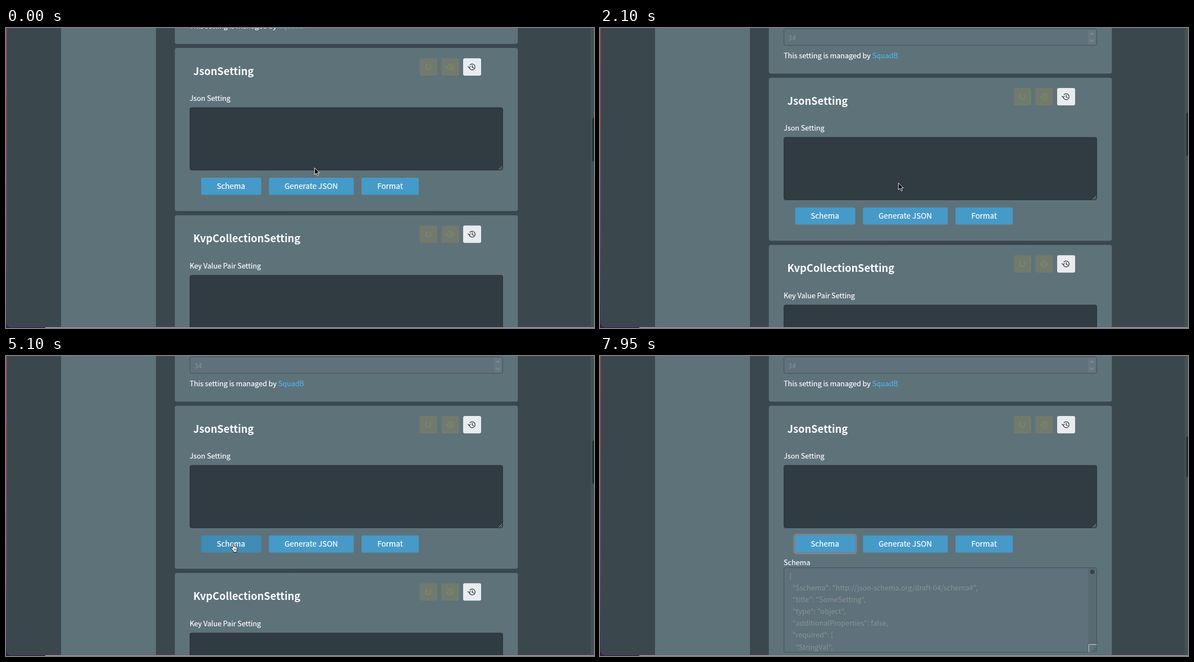
These frames come from a looping animation (1047 px wide and 535 px high, 8 s). An HTML page:

```html
<!DOCTYPE html>
<html lang="en">
<head>
<meta charset="utf-8">
<title>Settings page</title>
<style>
  html, body { margin: 0; width: 100%; height: 100%; overflow: hidden; background: #3a474c; }
  svg { display: block; }
  text { font: 12.6px "Noto Sans CJK JP", "Noto Sans CJK SC", "Noto Sans", sans-serif; fill: #fff; stroke: #fff; stroke-width: .2px; }
  .title { font-size: 18.3px; font-weight: 700; stroke: none; }
  .btn text { font-size: 13.5px; text-anchor: middle; }
  .btn rect { fill: #469ac8; }
  .btn .hover { fill: var(--btn); }
  .link { fill: #4db5ea; stroke: #4db5ea; }
  .muted, .muted text { fill: #8a9397; stroke: none; }
  .card { fill: #5e727a; stroke: #687b83; stroke-width: .6px; }
  .area { fill: #303c41; stroke: #2a3539; }
  .off { fill: #5f717a; stroke: #46545a; }
  .line { fill: none; stroke-linecap: round; stroke-linejoin: round; }

  #stage {
    --y: 0px; --ty: 151px; --th: 77px; --grow: 0px; --open: 0;
    --cx: 549px; --cy: 249px; --arrow: 1; --hand: 0; --btn: #469ac8;
    animation: scroll 8s step-end infinite, grow 8s step-end infinite,
      bar 8s step-end infinite, move 8s step-end infinite, pointer 8s step-end infinite;
  }
  #page { transform: translateY(var(--y)); }
  #below { transform: translateY(var(--grow)); }
  #first { height: calc(290px + var(--grow)); }
  #schema { opacity: var(--open); }
  .tall { height: max(0px, var(--grow) - 25.5px); }
  #grip { transform: translateY(calc(var(--grow) - 95.5px)); }
  #thumb { y: var(--ty); height: var(--th); }
  #cursor { transform: translate(var(--cx), var(--cy)); }
  #arrow { opacity: var(--arrow); }
  #hand { opacity: var(--hand); }

  @keyframes scroll {
    0% { --y: -53px; }
    1.875% { --y: -37px; }
    5.625% { --y: -17.6px; }
    7.5% { --y: -6px; }
    9.375%, 100% { --y: 0px; }
  }
  @keyframes bar {
    0% { --ty: 160px; --th: 78px; }
    1.875% { --ty: 157px; --th: 78px; }
    5.625% { --ty: 154px; --th: 78px; }
    7.5% { --ty: 152px; --th: 77px; }
    9.375% { --ty: 151px; --th: 77px; }
    65.625% { --ty: 147px; --th: 75px; }
    93.75% { --ty: 146px; --th: 75px; }
    95.625% { --ty: 145px; --th: 74px; }
    97.5% { --ty: 144px; --th: 73px; }
    99.375%, 100% { --ty: 143px; --th: 73px; }
  }
  @keyframes grow {
    0% { --grow: 0px; --open: 0; }
    65.625% { --grow: 95.5px; --open: 1; }
    93.75% { --grow: 105.5px; --open: 1; }
    95.625% { --grow: 130.5px; --open: 1; }
    97.5% { --grow: 157.5px; --open: 1; }
    99.375%, 100% { --grow: 176.5px; --open: 1; }
  }
  @keyframes move {
    0% { --cx: 549px; --cy: 249px; }
    26.25% { --cx: 531px; --cy: 276px; }
    28.125% { --cx: 462px; --cy: 305px; }
    30% { --cx: 401px; --cy: 304px; }
    31.875% { --cx: 458px; --cy: 336px; }
    33.75% { --cx: 520px; --cy: 314px; }
    35.625% { --cx: 541px; --cy: 306px; }
    41.25% { --cx: 540px; --cy: 308px; }
    43.125% { --cx: 530px; --cy: 310px; }
    45% { --cx: 505px; --cy: 313px; }
    46.875% { --cx: 468px; --cy: 316px; }
    48.75% { --cx: 432px; --cy: 326px; }
    50.625% { --cx: 410px; --cy: 333px; }
    52.5% { --cx: 400px; --cy: 334px; }
    73.125% { --cx: 560px; --cy: 362px; }
    75% { --cx: 745px; --cy: 398px; }
    76.875% { --cx: 846px; --cy: 418px; }
    78.75% { --cx: 868px; --cy: 432px; }
    80.625% { --cx: 877px; --cy: 439px; }
    82.5%, 100% { --cx: 880px; --cy: 441px; }
  }
  @keyframes pointer {
    0% { --arrow: 1; --hand: 0; --btn: #469ac8; }
    48.75% { --arrow: 0; --hand: 1; --btn: #408cb4; }
    73.125% { --arrow: 1; --hand: 0; --btn: #469ac8; }
    86.25%, 100% { --arrow: 0; --hand: 0; --btn: #469ac8; }
  }
</style>
</head>
<body>
<svg id="stage" width="1047" height="535" viewBox="0 0 1047 535">
  <defs>
    <linearGradient id="edge" x1="0" y1="0" x2="0" y2="1">
      <stop offset="0" stop-color="#b23848"/>
      <stop offset=".35" stop-color="#a42f4e"/>
      <stop offset=".65" stop-color="#7a3673"/>
      <stop offset="1" stop-color="#382052"/>
    </linearGradient>
    <clipPath id="fit"><rect class="tall" x="328" y="377" width="541"/></clipPath>
    <g id="clock" class="line">
      <path d="M-4.6 1.2A5.3 5.3 0 1 0-3.4-3.6M-6.8-.8-4.8 1.3-2.7-.8M.7-2.8V.4L2.9 1.8"/>
    </g>
    <g id="reset" class="line">
      <path d="M-2.6-3.3A4.4 4.4 0 1 0 2.6-3.3M-3.6-4.9-2.4-3.2-4.3-2.2"/>
    </g>
    <!-- Three tool buttons of a card header -->
    <g id="tools" stroke-width="1.3">
      <rect x="736.5" y="107" width="31.5" height="31" rx="3" fill="#717a6d"/>
      <rect x="775.3" y="107" width="31.5" height="31" rx="3" fill="#717a6d"/>
      <rect x="814" y="107" width="32" height="31" rx="3" fill="#e8ecef"/>
      <use href="#reset" x="752" y="122.5" stroke="#848867"/>
      <use href="#clock" x="790.5" y="122.5" stroke="#848867"/>
      <use href="#clock" x="829.5" y="122.5" stroke="#3a4146"/>
    </g>
    <path id="corner" class="line" d="M877.5 305.5 883 300M881 305.5 883 303.5" stroke-width=".9"/>
  </defs>

  <rect width="1047" height="535" fill="#b3a5ac"/>
  <rect y="533" width="70" height="2" fill="#2c1a48"/>
  <rect width="10" height="535" fill="url(#edge)"/>
  <rect x="1.5" y="-20" width="1060" height="553.5" rx="8" fill="#3a474c" stroke="#5c566a" stroke-width=".6"/>
  <rect x="98" width="169" height="533" fill="#5e727a"/>

  <svg width="1047" height="533.5">
    <g id="page">
      <rect class="card" x="301" y="-120" width="610" height="201" rx="3"/>
      <rect class="off" x="327.5" y="1.5" width="557" height="29.5" rx="3"/>
      <rect x="869" y="4" width="13" height="25" rx="2" fill="#677880"/>
      <path class="line" d="M873 11.5 875.6 8.8 878.2 11.5M873 21.5 875.6 24.2 878.2 21.5" stroke="#87949a" stroke-width="1.2"/>
      <text class="muted" x="335" y="21.7">34</text>
      <text x="327" y="53.7">This setting is managed by <tspan class="link">SquadB</tspan></text>

      <rect id="first" class="card" x="301" y="89" width="610" height="290" rx="3"/>
      <text class="title" x="333.5" y="136.8">JsonSetting</text>
      <use href="#tools"/>
      <text x="327" y="182.7">Json Setting</text>
      <rect class="area" x="327.5" y="195" width="557" height="111.5" rx="3"/>
      <use href="#corner" stroke="#a9b3b6"/>

      <g class="btn">
        <rect class="hover" x="347.5" y="320" width="107" height="30.5" rx="2.5"/>
        <rect x="468.3" y="320" width="151" height="30.5" rx="2.5"/>
        <rect x="633" y="320" width="102" height="30.5" rx="2.5"/>
        <text x="400.5" y="340">Schema</text>
        <text x="543.5" y="340">Generate JSON</text>
        <text x="684" y="340">Format</text>
      </g>

      <g id="schema">
        <rect x="346" y="318.5" width="110" height="33.5" rx="4" fill="none" stroke="#7c868b" stroke-width="3"/>
        <text x="327" y="372.7">Schema</text>
        <rect class="off tall" x="327.5" y="377.5" width="557" rx="3"/>
        <rect class="tall" x="869" y="378" width="15" fill="#586a72"/>
        <circle cx="876.7" cy="385" r="4" fill="#36434a"/>
        <g class="muted" clip-path="url(#fit)">
          <text x="337" y="396.7">{</text>
          <text x="342.6" y="417.8">"$schema": "http://json-schema.org/draft-04/schema#",</text>
          <text x="342.6" y="439">"title": "SomeSetting",</text>
          <text x="342.6" y="460.1">"type": "object",</text>
          <text x="342.6" y="481.3">"additionalProperties": false,</text>
          <text x="342.6" y="502.4">"required": [</text>
          <text x="348.2" y="523.6">"StringVal",</text>
        </g>
        <g id="grip">
          <rect x="870" y="433" width="14" height="13.5" fill="#5e727a"/>
          <path class="line" d="M870.5 446.5V433.5H884" stroke="#c6ced1"/>
          <use href="#corner" y="140" stroke="#323c41"/>
        </g>
      </g>

      <g id="below">
        <rect class="card" x="301" y="387.3" width="610" height="290" rx="3"/>
        <text class="title" x="333.5" y="435.1">KvpCollectionSetting</text>
        <use href="#tools" y="298.3"/>
        <text x="327" y="482">Key Value Pair Setting</text>
        <rect class="area" x="327.5" y="494" width="557" height="111.5" rx="3"/>
      </g>
    </g>
    <rect x="1041" width="6" height="534" fill="#445157"/>
    <rect id="thumb" x="1044" width="6" rx="2.5" fill="#252d31"/>
  </svg>

  <g id="cursor">
    <path id="arrow" d="M.4.4V12.6L3.3 9.9 5.4 14.6 7.4 13.7 5.4 9.2H9.2Z" fill="#000" stroke="#fff" stroke-width=".9"/>
    <g id="hand" class="line" stroke="#111" stroke-width=".9">
      <path d="M4.8 15.5V13.8L1 9.2Q.3 7.7 1.8 7.5L3.7 9.2 2.2 2.5Q2.1 1 3.3 1T4.8 2.4L5.6 6.2Q6.8 5.2 7.6 6.5 8.8 5.7 9.6 7 11.3 6.6 11.7 8.4L11.9 11Q11.7 12.7 10.9 13.8V15.5Z" fill="#fff"/>
      <path d="M6.2 9.8V12.7M8 9.8V12.7M9.8 9.8V12.7" stroke-width=".7"/>
    </g>
  </g>
</svg>
</body>
</html>
```
